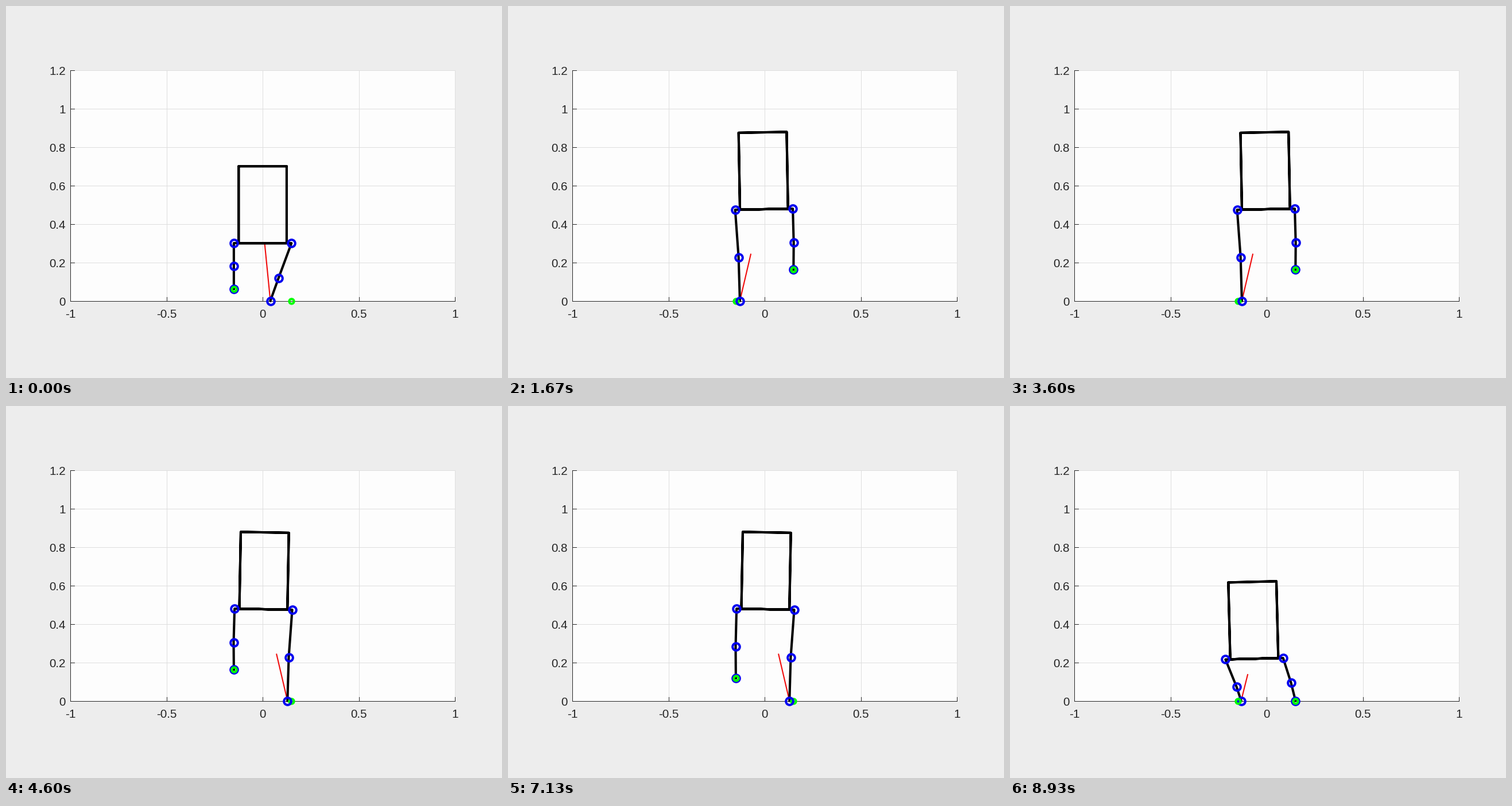
A matplotlib script that plays this animation: 864 by 648 pixels, repeating every 8990 ms.

```python
import numpy as np
import matplotlib.pyplot as plt
from matplotlib.animation import FuncAnimation

W, H, DPI = 864, 648, 72           # 72 dpi: one point is one pixel
FRAMES, LOOP_MS = 135, 8990
X0, Y0, UNIT = 447.1, 513.5, 334.8  # plot zero and pixels per unit
TARGET, STANCE = 0.15 * UNIT, 43.2  # foot distance from the middle
HIP, BODY_W, BODY_H = 0.15 * UNIT, 0.125 * UNIT, 0.4 * UNIT
STAND_Y = 354
STEP = 10                           # gait ticks per step
FALL, LAST = 264, 280               # gait ticks of the final collapse

plt.rcParams["font.family"] = "Liberation Sans"
plt.rcParams["axes.unicode_minus"] = False
fig = plt.figure(figsize=(W / DPI, H / DPI), dpi=DPI, facecolor="#ededed")
ax = fig.add_axes([0, 0, 1, 1])
ax.set_xlim(0, W)
ax.set_ylim(H, 0)
ax.axis("off")


def line(x, y, color, width, z, **kw):
    return ax.plot(x, y, color=color, lw=width, zorder=z,
                   solid_joinstyle="round", **kw)[0]


def draw_axes():
    left, right = X0 - UNIT, X0 + UNIT
    top, bottom = Y0 - 1.2 * UNIT, Y0
    ink, grid = "#262626", "#dedede"
    ax.fill([left, right, right, left], [top, top, bottom, bottom],
            color="#fdfdfd", lw=0, zorder=0)
    for v in (-1, -0.5, 0, 0.5, 1):
        x = X0 + v * UNIT
        line([x, x], [top, bottom], grid, 1, 1)
        line([x, x], [bottom, bottom - 6.7], ink, 1, 2)
        ax.text(x, 543.3, f"{v:g}", size=20.8, color=ink, ha="center")
    for i in range(7):
        y = Y0 - 0.2 * i * UNIT
        line([left, right], [y, y], grid, 1, 1)
        line([left, left + 6.7], [y, y], ink, 1, 2)
        ax.text(103.7, y + 8.3, f"{0.2 * i:.2g}", size=20.8, color=ink,
                ha="right")
    line([left, left], [top, bottom], ink, 1, 2)
    line([left, right], [bottom, bottom], ink, 1, 2)


def rings(color, size, z):
    return line([], [], color, 0, z, ls="none", marker="o", markersize=size,
                markerfacecolor="none", markeredgewidth=4, snap=False)


draw_axes()
red = line([], [], "#f00c0c", 2.1, 3, snap=False)
robot = line([], [], "black", 4.1, 4, snap=False)
rest_goal = rings("#00ff00", 8.3, 5)
joints = rings("#0000f0", 12.6, 6)
swing_goal = rings("#00ff00", 8.3, 7)
artists = [red, robot, rest_goal, joints, swing_goal]


def smooth(t):
    t = np.clip(t, 0, 1)
    return t * t * (3 - 2 * t)


def mix(a, b, t):
    return np.asarray(a, float) * (1 - t) + np.asarray(b, float) * t


def gait_tick(n):
    """Playback speed drifts a little around two ticks per frame."""
    return round(np.interp(n, [0, 12, 39, 54, 84, 107, 134],
                           [1, 27, 81, 113, 181, 228, LAST]))


def leg(side, swinging, k, lift, lean):
    """Knee and foot of one leg in the steady gait."""
    if swinging and k > 1:
        foot = (X0 + side * TARGET, Y0 - lift)
        knee = (X0 + side * 50.6, 412.5 + 0.463 * (foot[1] - 459.5))
    else:
        foot = (X0 + side * STANCE, Y0)
        knee = (X0 + side * (46.4 - side * lean), 437.5)
    return [knee, foot]


def draw(n):
    s = gait_tick(n)
    k = (s - 1) % STEP + 1
    support = 1 if (s - 1) // STEP % 2 == 0 else -1
    lift = 0.2 * UNIT * np.sin(np.pi * k / STEP)

    # The torso leans over the supporting foot soon after each change
    lean = support * np.clip(k - 2, -1, 1) * smooth((s - 27) / 30)
    roll = 0.0185 * lean
    pitch = 3 * np.exp(-((s - 25) / 10) ** 2)
    centre = np.array([X0 + 1.25 * lean, STAND_Y])
    legs = np.array([leg(side, side != support, k, lift, lean)
                     for side in (-1, 1)])
    rod = np.array([X0 + support * (STANCE - (13.3 if k == 1 else 19)),
                    432.5 + 1.3 * pitch])

    if s <= STEP:       # rise from the first crouch
        up = smooth((s - 1) / STEP)
        foot_y = Y0 - lift
        crouch = [[(X0 - TARGET, (413 + foot_y) / 2), (X0 - TARGET, foot_y)],
                  [(474.7, 474), (460.5, Y0)]]
        legs = mix(crouch, legs, up)
        centre = mix((X0, Y0 - 0.3 * UNIT), centre, up)
        rod = mix((450.5, 413), rod, up)
    if s > FALL:        # sink and drift left
        down = ((s - FALL) / (LAST - FALL)) ** 2
        heap = [[(394.6, 489), (402.6, Y0)],
                [(489.5, 482), (X0 + TARGET, Y0)]]
        legs = mix(legs, heap, down)
        centre = mix(centre, (425.5, 440.2), down)
        rod = mix(rod, (414, 468), down)
        roll = mix(roll, -0.025, down)

    across = np.array([np.cos(roll), np.sin(roll)])
    rise = BODY_H * np.array([np.sin(roll), -np.cos(roll)])
    hips = [centre - HIP * across, centre + HIP * across]
    base = [centre - BODY_W * across, centre + BODY_W * across]
    box = np.array([*base, base[1] + rise, base[0] + rise, *base])
    shift = np.array([pitch / 5, pitch])
    chain = np.array([legs[0, 1], legs[0, 0], *hips, legs[1, 0], legs[1, 1]])
    gap = [[np.nan, np.nan]]
    outline = np.concatenate([box - shift, gap, box + shift, gap, chain])

    robot.set_data(*outline.T)
    joints.set_data(*chain.T)
    stance_foot = legs[1 if support > 0 else 0, 1]
    red.set_data(*np.array([rod, stance_foot]).T)
    rest_goal.set_data([X0 + support * TARGET], [Y0])
    rest_goal.set_zorder(7 if s > FALL else 5)
    swing_goal.set_data([X0 - support * TARGET], [Y0 - lift])
    return artists


anim = FuncAnimation(fig, draw, frames=FRAMES, interval=LOOP_MS / FRAMES,
                     init_func=lambda: draw(0), repeat=True, repeat_delay=0)
plt.show()
```
